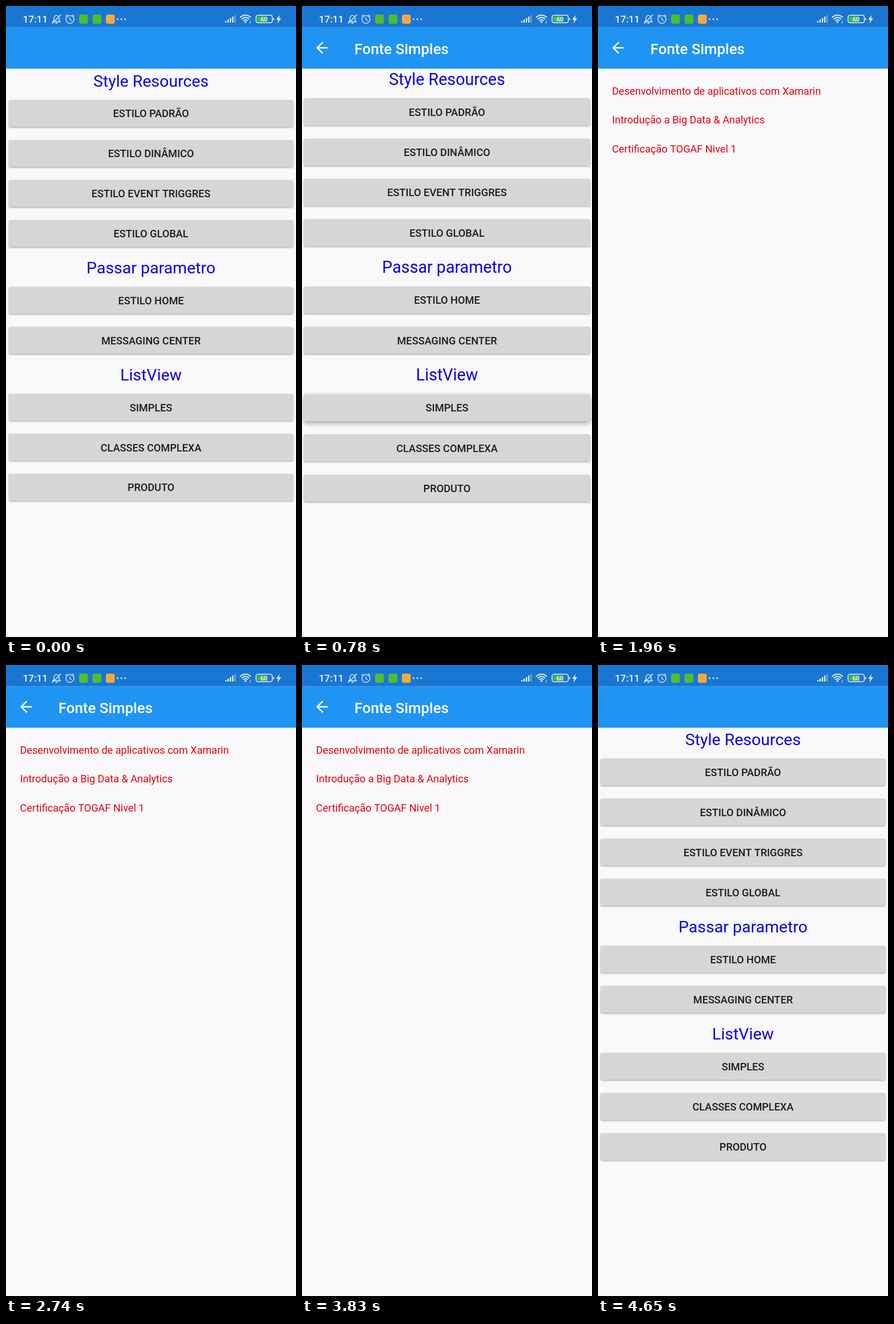
These frames come from a looping animation (508x1102 px, 4.69 s). An HTML page with a canvas:

```html
<!DOCTYPE html>
<html lang="pt">
<head>
<meta charset="utf-8">
<title>Fonte Simples</title>
<style>
html, body { margin: 0; width: 100%; height: 100%; overflow: hidden; background: #f9f9fb; }
canvas { display: block; width: 508px; height: 1102px; }
</style>
</head>
<body>
<canvas id="stage" width="508" height="1102"></canvas>
<script>
const W = 508, H = 1102, LOOP = 4690;
const BAR = 37.5, TOP = 109.5, MID = 606;
const OPEN = 756, CLOSE = 4425, SPAN = 350;
const PAGE = '#f9f9fb';
const FONT = 'Roboto, "Noto Sans", sans-serif';
const ctx = document.getElementById('stage').getContext('2d');

const sections = [
  { top: 164, title: 'Style Resources',
    items: ['ESTILO PADRÃO', 'ESTILO DINÂMICO', 'ESTILO EVENT TRIGGRES', 'ESTILO GLOBAL'] },
  { top: 490.5, title: 'Passar parametro', items: ['ESTILO HOME', 'MESSAGING CENTER'] },
  { top: 677.2, title: 'ListView', items: ['SIMPLES', 'CLASSES COMPLEXA', 'PRODUTO'] }
];
const courses = [
  'Desenvolvimento de aplicativos com Xamarin',
  'Introdução a Big Data & Analytics',
  'Certificação TOGAF Nivel 1'
];

const clamp = v => Math.max(0, Math.min(1, v));
const ramp = (t, start, span) => clamp((t - start) / span);
const bezier = (a, b, c, d, u) => {
  const v = 1 - u;
  return a * v * v * v + 3 * b * v * v * u + 3 * c * v * u * u + d * u * u * u;
};

// Fast out, extra slow in: two joined cubic curves.
function ease(x) {
  if (x <= 0 || x >= 1) return clamp(x);
  const first = x < 1 / 6;
  const xs = first ? [0, 0.05, 0.133333, 1 / 6] : [1 / 6, 0.208333, 0.25, 1];
  const ys = first ? [0, 0, 0.06, 0.4] : [0.4, 0.82, 1, 1];
  let lo = 0, hi = 1;
  for (let i = 0; i < 24; i++) {
    const m = (lo + hi) / 2;
    if (bezier(...xs, m) < x) lo = m; else hi = m;
  }
  return bezier(...ys, lo);
}

function text(str, x, y, size, color, weight = 400, align = 'left') {
  ctx.font = `${weight} ${size}px ${FONT}`;
  ctx.textAlign = align;
  ctx.fillStyle = color;
  ctx.fillText(str, x, y);
}

function box(x, y, w, h, r, color) {
  ctx.beginPath();
  ctx.roundRect(x, y, w, h, r);
  ctx.fillStyle = color;
  ctx.fill();
}

function line(points, width = 1.4) {
  ctx.beginPath();
  points.forEach(([x, y]) => ctx.lineTo(x, y));
  ctx.lineWidth = width;
  ctx.stroke();
}

function arc(x, y, r, from = 0, to = Math.PI * 2, width = 1.4) {
  ctx.beginPath();
  ctx.arc(x, y, r, from, to);
  ctx.lineWidth = width;
  ctx.stroke();
}

function button(label, y, lift) {
  ctx.save();
  ctx.shadowColor = `rgba(0,0,0,${0.3 + 0.06 * lift})`;
  ctx.shadowBlur = 3 + 5 * lift;
  ctx.shadowOffsetY = 1.5 + 2 * lift;
  box(5, y, 498, 47, 2.6, '#d5d7d6');
  ctx.restore();
  text(label, W / 2, y + 30.4, 18.1, '#1b1c1b', 500, 'center');
}

function home(lift) {
  for (const s of sections) {
    text(s.title, W / 2, s.top - 23.2, 28.46, '#0a00e2', 400, 'center');
    s.items.forEach((label, i) => button(label, s.top + i * 69.9, label === 'SIMPLES' ? lift : 0));
  }
}

function list() {
  ctx.fillStyle = PAGE;
  ctx.fillRect(0, TOP, W, H - TOP);
  courses.forEach((name, i) => text(name, 24.5, 155 + i * 50.4, 18.1, '#e3000b'));
}

function page(scale, alpha, draw) {
  if (alpha <= 0) return;
  ctx.save();
  ctx.beginPath();
  ctx.rect(0, TOP, W, H - TOP);
  ctx.clip();
  ctx.globalAlpha = alpha;
  ctx.translate(W / 2, MID);
  ctx.scale(scale, scale);
  ctx.translate(-W / 2, -MID);
  draw();
  ctx.restore();
}

function bell() {
  ctx.beginPath();
  ctx.moveTo(82, 27.5);
  ctx.lineTo(84, 25);
  ctx.lineTo(84, 21.5);
  ctx.bezierCurveTo(84, 15, 93, 15, 93, 21.5);
  ctx.lineTo(93, 25);
  ctx.lineTo(95, 27.5);
  ctx.closePath();
  ctx.lineWidth = 1.4;
  ctx.stroke();
  line([[87, 30], [90, 30]]);
  line([[81, 30.5], [96, 15.5]]);
}

function statusBar() {
  ctx.fillStyle = '#1976d2';
  ctx.fillRect(0, 0, W, BAR);
  const ink = '#e6f0fa';
  ctx.strokeStyle = ink;
  ctx.lineCap = 'round';
  text('17:11', 29.5, 29, 17.2, '#f2f8ff', 500);
  bell();

  arc(112, 23.5, 6.9);
  line([[112, 20], [112, 24], [114.8, 25.5]], 1.2);
  line([[104.8, 18], [107.5, 15.6]]);
  line([[119.2, 18], [116.5, 15.6]]);

  box(128, 15, 15.5, 16, 3.5, '#4dbf2f');
  box(151.5, 15, 15.5, 16, 3.5, '#4dbf2f');
  box(175, 15, 15.5, 16, 3.5, '#f5a93a');
  for (let i = 0; i < 3; i++) box(194 + i * 6.6, 21.6, 3, 3, 1.5, ink);

  for (let i = 0; i < 5; i++) {
    const h = 3 + i * 2.5;
    box(384 + i * 4, 29 - h, 2.4, h, 0.8, i < 4 ? ink : 'rgba(230,240,250,.45)');
  }

  const a = Math.PI * 1.25, b = Math.PI * 1.75;
  [4.5, 8.5, 12.5].forEach(r => arc(419.5, 28.5, r, a, b, 2));
  box(417.8, 26.3, 3.4, 3.4, 1.7, ink);
  line([[428, 26], [428, 30.5]], 1);

  ctx.beginPath();
  ctx.roundRect(438, 16.3, 28.5, 13, 3.5);
  ctx.lineWidth = 1.5;
  ctx.stroke();
  box(440, 18.2, 16, 9.2, 1.8, '#43bd3a');
  box(467.7, 20.8, 1.8, 4, 0.9, ink);
  text('60', 452, 26.9, 11, '#fff', 500, 'center');

  ctx.beginPath();
  [[479.5, 15.5], [473.5, 24], [477, 24], [475.5, 30.5], [482, 21.5], [478.3, 21.5]]
    .forEach(([x, y]) => ctx.lineTo(x, y));
  ctx.fillStyle = ink;
  ctx.fill();
}

function toolbar(titled) {
  ctx.fillStyle = '#2094f3';
  ctx.fillRect(0, BAR, W, TOP - BAR);
  if (!titled) return;
  ctx.strokeStyle = '#fff';
  ctx.lineCap = 'butt';
  line([[45.5, 73], [27, 73]], 2.4);
  line([[36.3, 63.4], [26.7, 73], [36.3, 82.6]], 2.4);
  text('Fonte Simples', 91.8, 84, 25.87, '#fff', 500);
}

function draw(t) {
  ctx.fillStyle = PAGE;
  ctx.fillRect(0, 0, W, H);

  if (t < CLOSE) {
    const p = ease(ramp(t, OPEN, SPAN));
    const fade = ramp(t, OPEN + 50, 83);
    page(1 + 0.15 * p, 1 - fade, () => home(ramp(t, 660, 100)));
    page(0.85 + 0.15 * p, fade, list);
  } else {
    const p = ease(ramp(t, CLOSE, SPAN));
    page(1.1 - 0.1 * p, 1, () => home(0));
    page(1 - 0.1 * p, 1 - ramp(t, CLOSE + 35, 50), list);
  }
  toolbar(t >= 735 && t < CLOSE);
  statusBar();
}

const begin = performance.now();
function tick() {
  draw((performance.now() - begin) % LOOP);
  requestAnimationFrame(tick);
}
tick();
</script>
</body>
</html>
```
